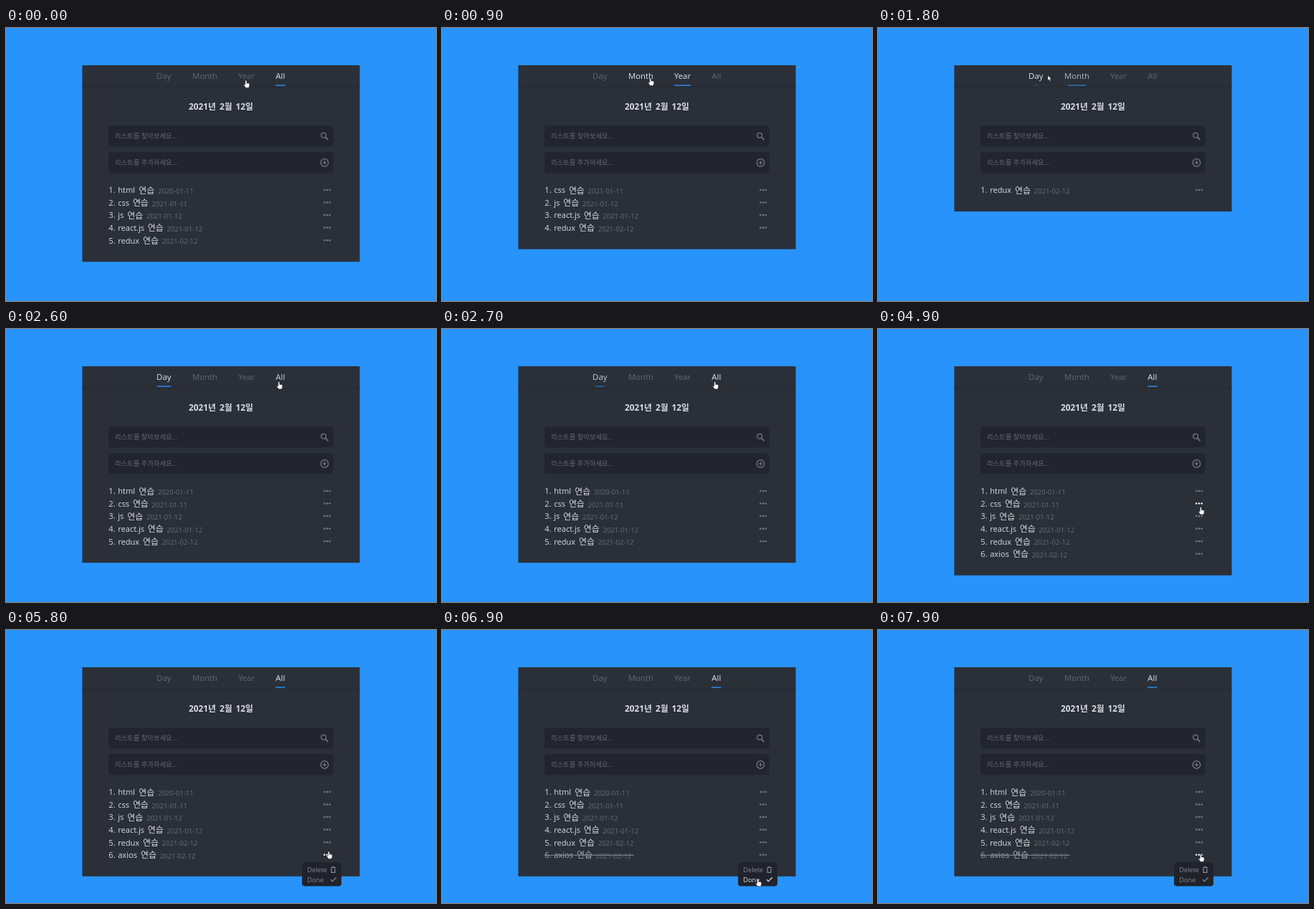
Recreate the animation shown at these times as an HTML page. Size 600 by 381 pixels, loop 8000 ms.

```html
<!DOCTYPE html>
<html lang="ko">
<head>
<meta charset="utf-8">
<title>To-do list</title>
<style>
  html, body { margin: 0; width: 100%; height: 100%; overflow: hidden; background: #2793fb; }
  svg { display: block; width: 100vw; height: 100vh; }
  text { white-space: pre; }
  .ui { font-family: "Open Sans", "Noto Sans CJK KR", "Noto Sans CJK JP", sans-serif; }
  .field { font: 9.3px "Liberation Sans", "Noto Sans CJK KR", "Noto Sans CJK JP", sans-serif; }
  #typed { font-size: 9px; }
  .tab { font-size: 11.4px; text-anchor: middle; }
  .title { font-size: 11.8px; font-weight: 700; text-anchor: middle; word-spacing: 2px; fill: #d9dce1; }
  .item { font-size: 11.1px; }
  .kor { font-size: 11.9px; }
  .date { font-size: 9.5px; fill: #6a6e77; }
  .menu { font-size: 9.2px; }
  .hint { fill: #656972; }
  .line { fill: none; stroke-width: 1.2; }
</style>
</head>
<body>
<svg id="stage" class="ui" viewBox="0 0 600 381">
  <rect width="600" height="381" fill="#2793fb"/>
  <rect id="panel" x="106.400" y="52" width="387.200" height="274" fill="#2b2f38"/>
  <rect x="106.400" y="81.500" width="387.200" height="1.500" fill="#272b33"/>
  <g id="tabs"></g>
  <text class="title" x="300" y="113.600">2021년 2월 12일</text>
  <rect x="143" y="136.500" width="313.500" height="29" rx="3" fill="#22252d"/>
  <rect x="143" y="173.300" width="313.500" height="29" rx="3" fill="#22252d"/>
  <text class="field hint" x="152" y="154.200">리스트를 찾아보세요...</text>
  <text class="field hint" id="hint" x="152" y="191">리스트를 추가하세요...</text>
  <text class="field" id="typed" x="152" y="191.300" fill="#e4e6e9"></text>
  <path id="wave" fill="none" stroke="#d8141f" stroke-width="1.1"/>
  <rect id="caret" y="183" width=".7" height="10" fill="#b4b7bd"/>
  <path class="line" d="M446 152.600L449.500 156.200" stroke="#787c85" style="stroke-width:1.6"/>
  <circle class="line" cx="443.200" cy="149.800" r="3.400" stroke="#787c85"/>
  <g id="plus" class="line"><circle cx="444.500" cy="188" r="5.300"/><path d="M441.700 188h5.600M444.500 185.200v5.600"/></g>
  <g id="list"></g>
  <g id="menu">
    <rect x="413" y="324.200" width="55" height="33.300" rx="4" fill="#20232b"/>
    <text class="menu" x="420.300" y="338.400" fill="#858992">Delete</text>
    <text class="menu" id="done" x="420.300" y="351.700">Done</text>
    <path class="line" d="M453.200 331.500h6.800M455.300 330.500h2.600M454.200 332.500v5.800h4.800v-5.800" stroke="#858992"/>
    <path class="line" id="check" d="M453 348.300l2.500 2.400 5.200-5.200"/>
  </g>
  <g id="cursor" stroke-linejoin="round">
    <path id="hand" transform="translate(.8 .9)" d="M-1.100 1.100Q-1.100 0 0 0T1.100 1.100V3.900Q4.500 3.900 5 5.200V7.500L3.900 10.500H-.3L-3 6.900Q-3.300 5.400-1.100 6.300Z" fill="#fff" stroke="#14161a" stroke-width=".6"/>
    <path id="arrow" d="M0 0V7.300L1.700 5.800 2.900 8.500 4.100 8 2.900 5.400H5.100Z" fill="#fff" stroke="#14161a" stroke-width=".5"/>
    <path id="beam" d="M-1.600 0H1.600M0 0V9M-1.600 9H1.600" fill="none" stroke="#c9ccd1" stroke-width=".8"/>
  </g>
</svg>
<script>
const LOOP = 8000, STEP = 100, PITCH = 17.55;
const ADD = 4450, STRIKE = 6900;
const NEVER = 1e6;
const $ = id => document.getElementById(id);

function make(parent, tag, attrs, text = '') {
  const el = document.createElementNS('http://www.w3.org/2000/svg', tag);
  set(el, attrs);
  el.textContent = text;
  parent.appendChild(el);
  return el;
}
function set(el, attrs) {
  for (const k in attrs) el.setAttribute(k, attrs[k]);
}
const show = (el, on) => set(el, { visibility: on ? 'visible' : 'hidden' });

const smooth = p => { p = Math.min(1, Math.max(0, p)); return p * p * (3 - 2 * p); };
// 0..1 level that fades in at each start and out at each end
const level = (t, spans, d) => spans.reduce((s, [a, b]) => s + smooth((t - a) / d) - smooth((t - b) / d), 0);
const mix = (a, b, p) => `rgb(${a.map((v, i) => Math.round(v + (b[i] - v) * p))})`;
const DIM = [99, 103, 112], LIT = [225, 228, 232];

// lit: hovered or chosen; on: chosen
const tabs = [
  { name: 'Day', x: 220.3, w: 20, lit: [[1450, 2640]], on: [[1700, 2580]] },
  { name: 'Month', x: 277.5, w: 35, lit: [[690, 1720]], on: [[1060, 1700]] },
  { name: 'Year', x: 335.5, w: 23, lit: [[0, 1060]], on: [[200, 1060]] },
  { name: 'All', x: 382.8, w: 13.4, lit: [[-NEVER, 200], [2450, NEVER]], on: [[-NEVER, 200], [2580, NEVER]] }
];
for (const tab of tabs) {
  tab.text = make($('tabs'), 'text', { class: 'tab', x: tab.x, y: 71 }, tab.name);
  tab.bar = make($('tabs'), 'rect', { y: 79.4, height: 1.4, fill: '#2793fb' });
}

// word, x of the date, date
const items = [
  ['html', 212, '2020-01-11'],
  ['css', 203.6, '2021-01-11'],
  ['js', 196, '2021-01-12'],
  ['react.js', 224.5, '2021-01-12'],
  ['redux', 217.8, '2021-02-12'],
  ['axios', 214.7, '2021-02-12']
].map(([word, x, date]) => {
  const g = make($('list'), 'g', {});
  const num = make(g, 'text', { class: 'item', x: 143.3, y: 230.4 });
  make(g, 'text', { class: 'item', x: 156.2, y: 230.4 }, word);
  make(g, 'text', { class: 'kor', x: x - 26.7, y: 230.6 }, '연습');
  make(g, 'text', { class: 'date', x, y: 231.2 }, date);
  const dots = make(g, 'g', {});
  for (const dx of [-3.7, 0, 3.7]) make(dots, 'circle', { cx: 448 + dx, cy: 226, r: 1.3 });
  return { g, num, dots };
});
const strike = make(items[5].g, 'rect', { x: 143, y: 226, width: 125, height: 1, fill: '#8c9098' });

const typing = ['a', 'ax', 'axi', 'axio', 'axios', 'axios ', 'axios ㅇ', 'axios 여', 'axios 연', 'axios 연ㅅ', 'axios 연스', 'axios 연습'];
set($('wave'), { d: 'M152 191.800' + 'l1.250-1 1.250 1'.repeat(8) });

// cursor tip: time, x, y
const path = [
  [0, 334, 72], [500, 334, 72], [820, 290, 69], [1100, 290, 69], [1500, 222, 68], [1700, 222, 68],
  [1800, 237, 66], [1900, 246, 67], [2500, 380, 72.5], [2750, 380, 72.5], [3030, 265, 252], [3300, 200, 183],
  [3850, 200, 183], [4250, 449.5, 184], [4600, 449.5, 184], [5150, 449.5, 296], [5400, 449.5, 308],
  [6000, 449.5, 308], [6400, 440, 351], [6700, 440, 346.5], [7000, 440, 346.5], [7600, 449.5, 312], [LOOP, 449.5, 312]
];
function tipAt(t) {
  const i = path.findIndex(k => k[0] > t);
  const [a, x, y] = path[i - 1], [b, u, v] = path[i];
  const p = smooth((t - a) / (b - a));
  return [x + (u - x) * p, y + (v - y) * p];
}

function visible(t) {
  if (t < 200 || t >= 2580) return t >= ADD ? [0, 1, 2, 3, 4, 5] : [0, 1, 2, 3, 4];
  return t < 1060 ? [1, 2, 3, 4] : [4];
}

function draw(t) {
  const [x, y] = tipAt(t);
  const within = (l, top, r, b) => x >= l && x <= r && y >= top && y <= b;
  let hand = false;

  for (const tab of tabs) {
    const on = level(t, tab.on, 300), w = tab.w * on;
    set(tab.text, { fill: mix(DIM, LIT, level(t, tab.lit, 200)) });
    set(tab.bar, { x: tab.x - w / 2, width: w, opacity: on });
    hand = hand || within(tab.x - tab.w / 2 - 2, 58, tab.x + tab.w / 2 + 2, 82);
  }

  const rows = visible(t);
  set($('panel'), { height: 186.5 + PITCH * rows.length });
  items.forEach((item, i) => {
    const n = rows.indexOf(i), on = n >= 0, dy = n * PITCH;
    const over = on && within(442, 219 + dy, 454, 233 + dy);
    set(item.g, {
      transform: `translate(0 ${dy})`,
      display: on ? 'inline' : 'none',
      fill: i === 5 && t >= STRIKE ? '#a7abb1' : '#dadde1'
    });
    item.num.textContent = `${n + 1}.`;
    set(item.dots, { fill: over ? '#f4f5f6' : '#757982' });
    hand = hand || over;
  });
  show(strike, t >= STRIKE);

  const key = Math.min(typing.length - 1, Math.floor((t - 3500) / 60));
  const text = key >= 0 && t < ADD ? typing[key] : '';
  $('typed').textContent = text;
  show($('hint'), !text);
  show($('wave'), text.length > 5);
  show($('caret'), t >= 3300 && t < ADD);
  set($('caret'), { x: 152.3 + (text ? $('typed').getComputedTextLength() : 0) });

  const overPlus = within(438, 180, 452, 196);
  set($('plus'), { stroke: overPlus ? '#a4a8af' : '#787c85' });

  const open = level(t, [[5400, 6950], [7700, NEVER]], 200);
  const overMenu = open > 0.3 && within(413, 325, 468, 358);
  const done = overMenu && y > 341 ? '#e1e4e8' : '#858992';
  set($('menu'), { opacity: open });
  set($('done'), { fill: done });
  set($('check'), { stroke: done });

  hand = hand || overPlus || overMenu;
  const beam = !hand && (within(143, 136, 437, 165) || within(143, 173, 437, 202));
  set($('cursor'), { transform: `translate(${x} ${y})` });
  show($('hand'), hand);
  show($('beam'), beam);
  show($('arrow'), !hand && !beam);
}

const start = performance.now();
function tick() {
  const t = (performance.now() - start) % LOOP;
  draw(Math.floor(t / STEP) * STEP);
  requestAnimationFrame(tick);
}
tick();
</script>
</body>
</html>
```
